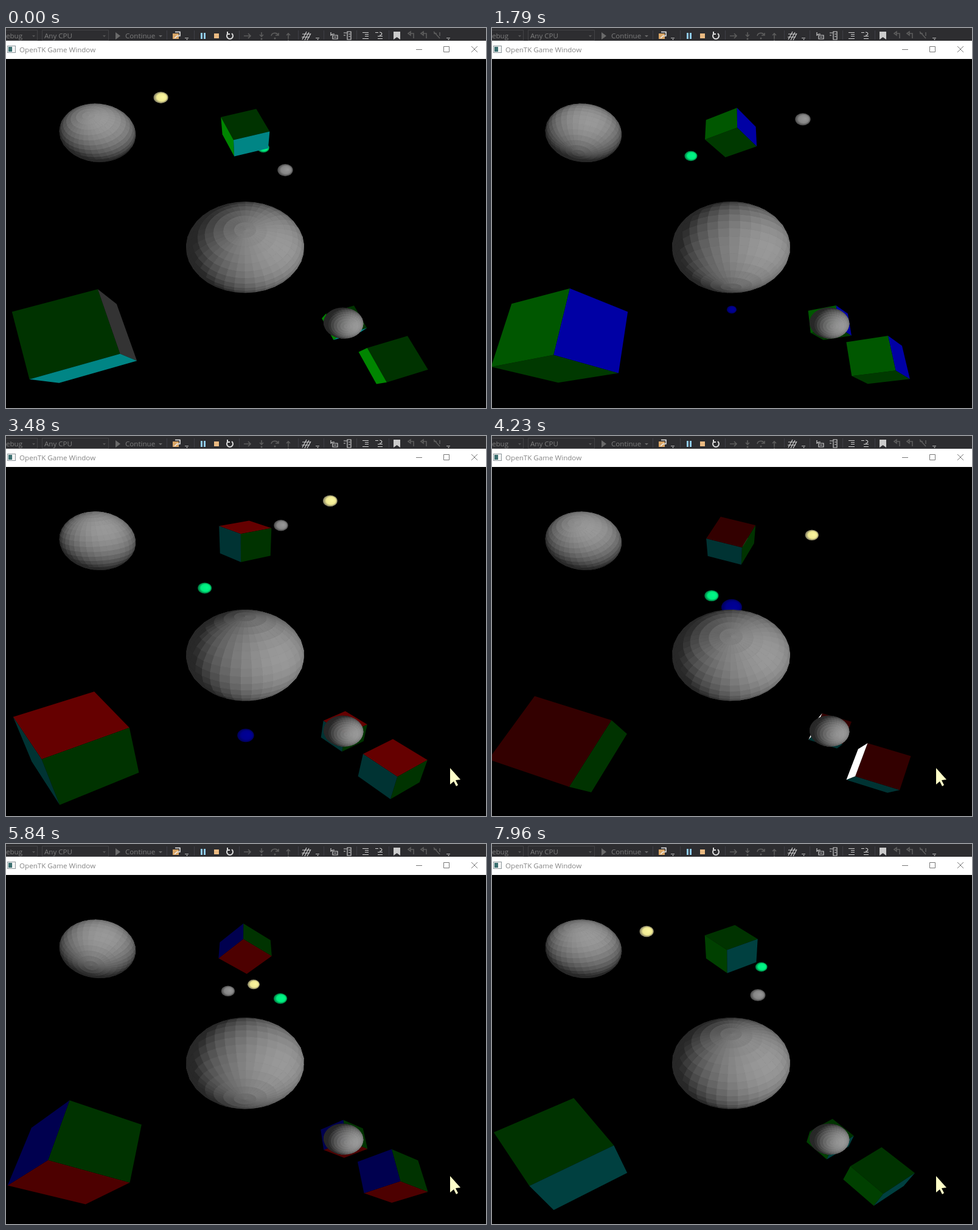
These frames come from a looping animation (789 by 626 pixels, 8 s). An HTML page with a canvas:

```html
<!DOCTYPE html>
<html lang="en">
<head>
<meta charset="utf-8">
<title>OpenTK Game Window</title>
<style>
  html, body { margin: 0; width: 100%; height: 100%; overflow: hidden; background: #000; }
  canvas, svg { position: absolute; left: 0; top: 0; display: block; }
  text { font: 11.6px "Open Sans", "Noto Sans", sans-serif; }
</style>
</head>
<body>
<canvas id="scene" width="789" height="626"></canvas>
<svg width="789" height="626" viewBox="0 0 789 626" fill="none">
  <!-- toolbar -->
  <rect width="789" height="21" fill="#2d2d30"/>
  <g stroke="#434346">
    <path d="M-1 3.5H51.5V20.5H-1M59.5 3.5H168.5V20.5H59.5Z"/>
    <path d="M264.5 4V19M309.5 4V19M522.5 4V19" stroke="#3f3f46"/>
    <path d="M383.5 4V19M480.5 4V19M576.5 4V19M629.5 4V19" stroke="#3f3f46"/>
  </g>
  <g fill="#7c7c7c">
    <text x="0" y="17">ebug</text>
    <text x="63" y="17">Any CPU</text>
    <text x="196" y="17">Continue</text>
    <path d="M180 7V19L188 13ZM251 12H257L254 15Z" fill="#6a6a6a"/>
    <path d="M43 12H48L45.500 15ZM159 12H164L161.500 15Z" fill="#555"/>
  </g>
  <path d="M274 9H284V18H274Z" fill="#d9a566"/>
  <path d="M278 6.500H286V13H281L277 17" stroke="#eee" stroke-width="1.500"/>
  <g fill="#b5b5b5">
    <path d="M294 16H300V17H294ZM296 18H299L297.500 20ZM509 16H515V17H509ZM511 18H514L512.500 20ZM724 16H730V17H724ZM726 18H729L727.500 20Z"/>
  </g>
  <path d="M320 8H323V18H320ZM325 8H328V18H325Z" fill="#8fcaf7"/>
  <path d="M342 9H350V17H342Z" fill="#eaba82"/>
  <path d="M365 9A5 5 0 1 0 371 9M364 6V10H368" stroke="#ddd" stroke-width="2"/>
  <g stroke="#5c5c5c" stroke-width="1.600">
    <path d="M391 13H402M398 9L402 13L398 17M420 7V14M417 11L420 14L423 11M464 18V9M461 12L464 9L467 12"/>
    <path d="M436 13C437 7 446 7 447 12M443 12H448V8"/>
    <path d="M661 9L665 6V12ZM664 9H670V17M682 9L686 6V12ZM685 9H691V17M703 9H708M703 6L713 17M713 7V13"/>
  </g>
  <g fill="#5c5c5c"><circle cx="420" cy="18" r="1.500"/><circle cx="442" cy="17" r="1.500"/><circle cx="464" cy="20" r="1"/></g>
  <g stroke="#d0d0d0" stroke-width="1.200">
    <path d="M487 19L494 6M491 20L498 7M495 20L501 9M487 10H500M486 15H499"/>
    <path d="M534 7V12L537 10H540M537 12H545V18H537ZM539 15H543"/>
    <path d="M555 8H560M555 12H558M561 6H567V19H561ZM563 10H566M563 14H566"/>
    <path d="M586 7.500H596M590 10.500H596M590 13.500H596M586 17.500H596"/>
    <path d="M607 7.500H612M614 7C619 7 619 12 614 12M611 13.500H619M611 17.500H619"/>
  </g>
  <path d="M637 6H648V19L642.500 15L637 19Z" fill="#ccc"/>
  <!-- title bar -->
  <rect y="21" width="789" height="30" fill="#fff"/>
  <rect x="2.500" y="29.500" width="13" height="11" fill="#f4f4f4" stroke="#8d979c"/>
  <rect x="4" y="31" width="6" height="8" fill="#3b6f70"/>
  <text x="22" y="40" fill="#858585">OpenTK Game Window</text>
  <path d="M674 35.500H684M719.500 30.500H728.500V39.500H719.500ZM765 30L775 40M775 30L765 40" stroke="#777"/>
  <path id="cursor" d="M0 0V27L6 22L10 30L13 28L9 20L17 19Z" fill="#ffffc8"/>
</svg>
<script>
const ctx = document.getElementById('scene').getContext('2d');
const cursor = document.getElementById('cursor');
const FX = 890, FY = 688, CX = 393, CY = 336;
const LOOP = 8000, STEP = 77.7, RAD = Math.PI / 180;
const TILT = 2.5; // the tilt runs slightly ahead of the spin

// step, angle in degrees, then light on each cube face
const KEYS = [
  [0, 20, .2, .2, .52, .2, .52, .5],
  [12, -22.3, .2, .3, .48, .2, .4, .69],
  [34, -93.4, .25, .59, .2, .5, .2, .6],
  [54, -158.4, .2, .2, .2, 1, .2, .4],
  [75, -228.7, .2, .3, .2, .8, .2, .31],
  [93, -291.8, .2, .3, .2, .4, .21, .3],
  [102, -323.5, .2, .2, .25, .2, .25, .3]
];
const POINTER = [[30, 800, 395], [34, 760, 424], [37, 767, 450], [42, 730, 547]];
const FACES = [[0, 1, 0], [1, 0, 0], [0, 1, 0], [1, 1, 1], [0, 1, 1], [0, 0, 1]];

function sample(keys, n) {
  let i = 0;
  while (i < keys.length - 2 && n > keys[i + 1][0]) i++;
  const a = keys[i], b = keys[i + 1];
  const k = Math.max(0, Math.min(1, (n - a[0]) / (b[0] - a[0])));
  return a.slice(1).map((v, j) => v + (b[j + 1] - v) * k);
}

const mix = (a, x, b, y, c, z) => a.map((v, i) => v * x + b[i] * y + c[i] * z);
const dot = (a, b) => a[0] * b[0] + a[1] * b[1] + a[2] * b[2];

// Spin about the pole, then tilt the pole about the screen's x axis
function axes(spin, tilt) {
  const s = Math.sin(spin * RAD), c = Math.cos(spin * RAD);
  const ts = Math.sin(tilt * RAD), tc = Math.cos(tilt * RAD);
  return { g: [-c, -s * tc, s * ts], c: [s, -c * tc, c * ts], p: [0, ts, tc] };
}

function project(o, q) {
  const z = o.d - q[2];
  return [
    CX + ((o.x - CX) * o.d + FX * q[0]) / z,
    CY + ((o.y - CY) * o.d - FY * q[1]) / z
  ];
}

function polygon(pts, color, seam) {
  let area = 0;
  pts.forEach((a, i) => {
    const b = pts[(i + 1) % pts.length];
    area += a[0] * b[1] - b[0] * a[1];
  });
  if (area >= 0) return;
  ctx.beginPath();
  pts.forEach(a => ctx.lineTo(a[0], a[1]));
  ctx.closePath();
  ctx.fillStyle = ctx.strokeStyle = color;
  ctx.fill();
  if (seam) ctx.stroke();
}

function cube(o, m, light) {
  const neg = a => a.map(v => -v);
  const sides = [
    [m.p, m.g, m.c], [neg(m.p), m.c, m.g],
    [m.g, m.c, m.p], [neg(m.g), m.p, m.c],
    [m.c, m.p, m.g], [neg(m.c), m.g, m.p]
  ];
  sides.forEach(([n, a, b], i) => {
    const pts = [[-1, -1], [1, -1], [1, 1], [-1, 1]]
      .map(([s, t]) => project(o, mix(n, .5, a, s / 2, b, t / 2)));
    polygon(pts, `rgb(${FACES[i].map(v => Math.round(v * light[i] * 255))})`);
  });
}

function sphere(o, m) {
  const stacks = 18, sectors = 36, len = Math.hypot(...o.light);
  const at = (i, j) => {
    const a = i * Math.PI / stacks, b = j * 2 * Math.PI / sectors, s = Math.sin(a);
    return mix(m.p, Math.cos(a), m.g, s * Math.cos(b), m.c, s * Math.sin(b));
  };
  ctx.lineWidth = 1;
  ctx.lineJoin = 'round';
  for (let i = 0; i < stacks; i++) {
    for (let j = 0; j < sectors; j++) {
      const k = dot(at(i + .5, j + .5), o.light) / len;
      const v = Math.round(40 + 113 * Math.max(0, k));
      const pts = [at(i, j), at(i + 1, j), at(i + 1, j + 1), at(i, j + 1)].map(q => project(o, q));
      polygon(pts, `rgb(${v},${v},${v})`, true);
    }
  }
}

function ball(x, y, r, lit, mid, dark) {
  ctx.save();
  ctx.translate(x, y);
  ctx.scale(1, .79);
  const fill = ctx.createRadialGradient(r * .35, -r * .1, 0, 0, 0, r);
  fill.addColorStop(0, lit);
  fill.addColorStop(.65, mid);
  fill.addColorStop(1, dark);
  ctx.fillStyle = fill;
  ctx.beginPath();
  ctx.arc(0, 0, r, 0, 7);
  ctx.fill();
  ctx.restore();
}

function orbiters(turn) {
  const c = Math.cos(turn), s = Math.sin(turn);
  const yellow = 1 + .13 * Math.cos(turn - 70 * RAD);
  ball(CX + (2.5 - 135 * c + 38 * s) * yellow, CY + (-195 - 17 * c - 73.5 * s) * yellow,
    11.6 * yellow, '#fbf7a0', '#f0ea94', '#77735c');
  const gray = 1 + .08 * Math.cos(turn - 40 * RAD);
  ball(CX + (40.5 + 21.7 * c + 67.4 * s) * gray, CY + (-133.7 + 37.7 * c - 50 * s) * gray,
    12 * gray, '#989898', '#868686', '#454545');
  ball(CX + 30 * c - 74 * s, 230.5 - 33 * c - 13 * s,
    10.8 - .9 * c, '#00f888', '#00ec7e', '#006a38');
}

function blueBall(turn) {
  if (turn < 55 * RAD || turn > 212 * RAD) return;
  const q = turn - 104.8 * RAD, depth = 90.8 - 40 * Math.sin(q);
  ball(394, CY + FY * (40 * Math.cos(q) - 15.4) / depth, FX / depth, '#000098', '#00008c', '#000058');
}

const still = axes(0, 0);
const cubes = {
  top: { x: 393, y: 173, d: 14.7 },
  back: { x: 555, y: 486, d: 17.9 },
  left: { x: 118, y: 510, d: 6.5 },
  right: { x: 634, y: 547.5, d: 12.45 }
};
const spheres = {
  small: { x: 554.5, y: 486, d: 28, light: [.5, 0, .85] },
  big: { x: 393, y: 361, d: 9.25, light: [.58, 0, .81] },
  left: { x: 151.5, y: 173.5, d: 14.8, light: [.4, .2, .9] }
};

function draw(t) {
  const n = Math.floor(t / STEP);
  const [deg, ...light] = sample(KEYS, n);
  const m = axes(deg, deg + TILT), turn = (20 - deg) * RAD;
  ctx.fillStyle = '#000';
  ctx.fillRect(0, 0, 789, 626);
  orbiters(turn);
  cube(cubes.top, m, light);
  blueBall(turn);
  cube(cubes.back, m, light);
  sphere(spheres.small, still);
  sphere(spheres.big, m);
  sphere(spheres.left, m);
  cube(cubes.left, m, light);
  cube(cubes.right, m, light);
  cursor.setAttribute('transform', `translate(${sample(POINTER, n)})`);
}

let start;
function tick(now) {
  start ??= now;
  draw((now - start) % LOOP);
  requestAnimationFrame(tick);
}
draw(0);
requestAnimationFrame(tick);
</script>
</body>
</html>
```
